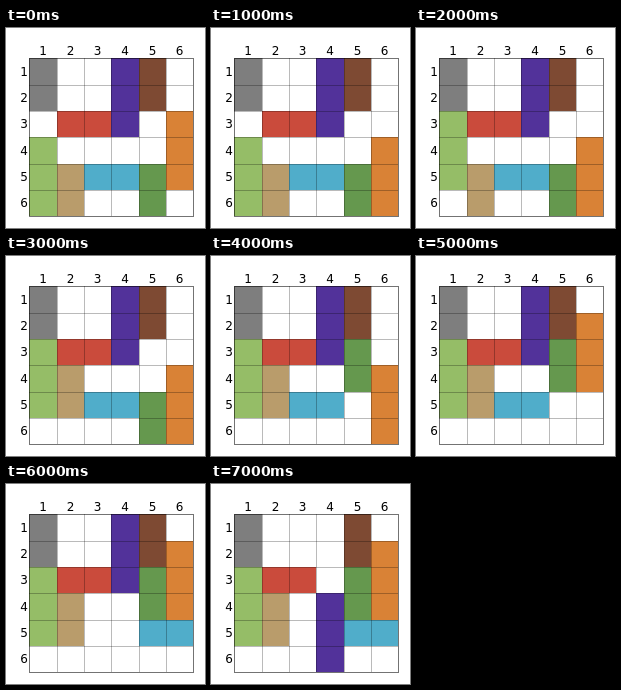
Write an HTML page with a canvas that moves like this. It is 199 px wide and 200 px high and loops after 8000 ms.

```html
<!DOCTYPE html>
<html lang="en">
<head>
<meta charset="utf-8">
<title>Sliding blocks</title>
<style>
html, body { margin: 0; overflow: hidden; background: #fff; }
canvas { display: block; }
</style>
</head>
<body>
<canvas width="199" height="200"></canvas>
<script>
const ctx = document.querySelector('canvas').getContext('2d');
const SIZE = 6, STEP = 1000, LOOP = 8000;
const gridX = i => Math.round(23.4 + i * 82 / 3);
const gridY = i => Math.round(30.4 + i * 79 / 3);

// Column, row, width, height of each block at the start
const blocks = {
  gray:   ['#7e7e7e', 0, 0, 1, 2],
  purple: ['#52329a', 3, 0, 1, 3],
  brown:  ['#7e4a33', 4, 0, 1, 2],
  red:    ['#ca4b3c', 1, 2, 2, 1],
  orange: ['#d98236', 5, 2, 1, 3],
  lime:   ['#95bd67', 0, 3, 1, 3],
  tan:    ['#b99c6b', 1, 4, 1, 2],
  cyan:   ['#50adca', 2, 4, 2, 1],
  green:  ['#65984e', 4, 4, 1, 2],
};

// One move per second: block, columns, rows
const moves = [
  ['orange', 0, 1], ['lime', 0, -1], ['tan', 0, -1], ['green', 0, -2],
  ['orange', 0, -2], ['cyan', 2, 0], ['purple', 0, 3],
];

function drawGrid() {
  const left = gridX(0), top = gridY(0);
  const width = gridX(SIZE) - left, height = gridY(SIZE) - top;
  ctx.fillStyle = 'rgba(0, 0, 0, 0.27)';
  for (let i = 1; i < SIZE; i++) {
    ctx.fillRect(gridX(i), top, 1, height);
    ctx.fillRect(left, gridY(i), width, 1);
  }
  ctx.strokeStyle = 'rgba(0, 0, 0, 0.55)';
  ctx.strokeRect(left + 0.5, top + 0.5, width, height);
}

function drawLabels() {
  ctx.fillStyle = '#000';
  ctx.font = '12px "DejaVu Sans", sans-serif';
  for (let i = 0; i < SIZE; i++) {
    ctx.textAlign = 'center';
    ctx.fillText(i + 1, (gridX(i) + gridX(i + 1)) / 2, 27);
    ctx.textAlign = 'right';
    ctx.fillText(i + 1, 22, Math.round((gridY(i) + gridY(i + 1)) / 2) + 4);
  }
}

function draw(time) {
  const done = moves.slice(0, Math.floor(time % LOOP / STEP));
  ctx.fillStyle = '#fff';
  ctx.fillRect(0, 0, 199, 200);
  for (const [name, [color, startCol, startRow, w, h]] of Object.entries(blocks)) {
    let col = startCol, row = startRow;
    for (const [moved, dx, dy] of done) {
      if (moved === name) { col += dx; row += dy; }
    }
    const x = gridX(col), y = gridY(row);
    ctx.fillStyle = color;
    ctx.fillRect(x, y, gridX(col + w) - x, gridY(row + h) - y);
  }
  drawGrid();
  drawLabels();
}

const start = performance.now();
function tick() {
  draw(performance.now() - start);
  requestAnimationFrame(tick);
}
tick();
</script>
</body>
</html>
```
